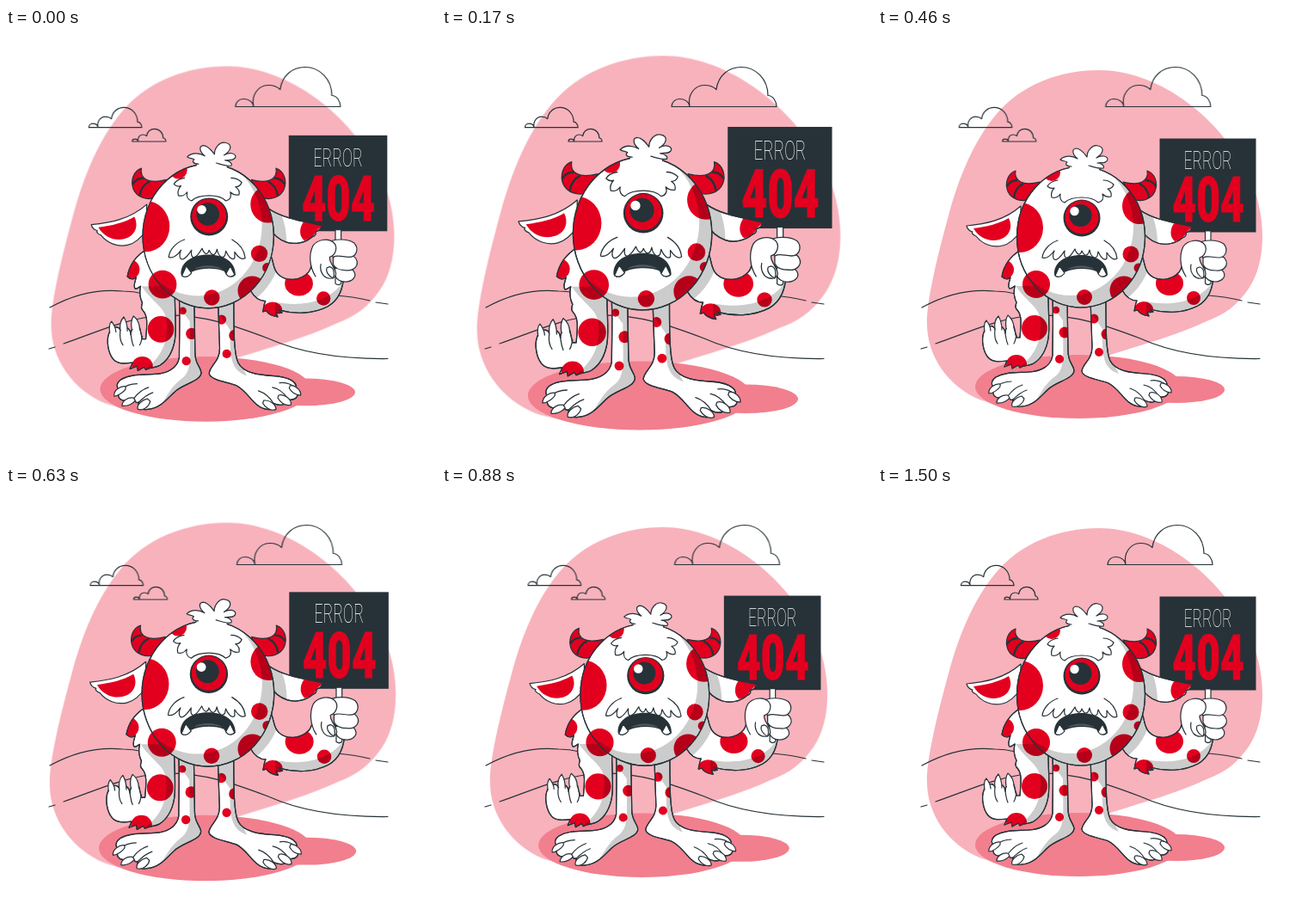
These frames come from a looping animation (500 by 500 pixels, 1.54 s). An HTML page without scripts:

```html
<!DOCTYPE html>
<html lang="en">
<head>
<meta charset="utf-8">
<title>Error 404</title>
<style>
  html, body { margin: 0; height: 100%; overflow: hidden; background: #fff; }
  svg { display: block; width: 100vw; height: 100vh; }

  .ink, .skin { stroke: #263238; stroke-width: 1.2; stroke-linecap: round; stroke-linejoin: round; }
  .ink { fill: none; }
  .skin { fill: #fff; }
  .red { fill: #e3001f; }
  .dark { fill: #263238; }
  .shade { fill: #000; opacity: .2; }
  .cloud { vector-effect: non-scaling-stroke; }
  .stripe { fill: none; stroke: #263238; stroke-width: 2.4; }

  .beat { animation: beat 1540ms linear -34ms infinite; }
  .blob { fill: #f8b2bc; transform-origin: 252px 249px; }
  .figure { transform-origin: 271px 291px; }
  .clouds { animation: shake 1540ms linear -34ms infinite; }

  .sign { font-family: Roboto, "Open Sans", sans-serif; text-anchor: middle; }
  .word { font-size: 29.5px; font-weight: 200; fill: #fff; }
  .code { font-size: 71.5px; font-weight: 900; stroke: #e3001f; stroke-width: .8; }

  @keyframes beat {
    0%, 30%, 40%, 60%, 100% { transform: scale(1); }
    10%, 50% { transform: scale(1.1); }
  }
  @keyframes shake {
    0%, 100% { transform: translateX(0); }
    10%, 90% { transform: translateX(-1px); }
    20%, 80% { transform: translateX(2px); }
    30%, 50%, 70% { transform: translateX(-4px); }
    40%, 60% { transform: translateX(4px); }
  }
</style>
</head>
<body>
<svg viewBox="0 0 500 500">
  <defs>
    <path id="cloud" class="ink cloud" d="M0 0C0-5 4-9 9-9C15-9 20-6 21 0C18-14 27-25 38-25C44-25 49-23 52-20C54-36 66-46 81-46C98-46 112-32 112-13C118-13 122-6 122 0Z"/>

    <ellipse id="body" cx="236" cy="243" rx="74.500" ry="82"/>
    <path id="earR" d="M305 212C321 223 343 226 365 231C364 236 361 237 358 238C359 241 357 243 354 244C346 251 334 253 325 250C316 247 309 240 305 233Z"/>
    <path id="armL" d="M166 258C153 266 146 277 144 289C147 292 151 293 154 290C153 295 150 300 153 303C156 303 157 301 159 300C157 309 159 315 161 319C160 323 159 325 162 328C168 335 166 346 165 360L161 360L158 347C152 345 148 348 148 355C147 346 140 345 136 350C134 345 126 345 123 354C120 362 122 376 128 383C133 389 142 388 150 387L147 394L155 391L156 396L163 392L165 395C170 392 176 393 181 390C192 383 196 373 198 361C200 348 198 332 198 310Z"/>
    <path id="armR" d="M305 262C311 268 308 280 316 287C325 295 341 294 350 284C354 279 355 271 356 264L390 285C390 300 386 315 372 323C355 332 334 332 316 327L320 330C317 331 315 331 313 330L315 335C309 334 304 332 302 328L298 329C299 325 299 321 301 317C295 317 289 314 284 305Z"/>
    <path id="legL" d="M203 315C204 340 203 361 203 381C201 393 190 399 176 400C160 401 147 400 137 406C130 411 132 417 136 418C131 425 135 431 144 430C146 432 149 430 151 428C153 432 154 433 157 432C155 439 161 441 167 440C182 439 190 427 198 420C207 411 228 408 228 398C227 391 221 389 221 376L220 315Z"/>
    <path id="legR" d="M247 315L249 371C249 386 238 390 237 399C238 407 258 409 268 413C282 420 287 438 303 440C309 441 312 438 310 433C318 437 325 435 327 429C337 430 340 424 336 416C337 407 324 403 311 402C294 401 276 399 270 387C265 377 265 350 265 315Z"/>

    <clipPath id="inBody"><use href="#body"/></clipPath>
    <clipPath id="inEarR"><use href="#earR"/></clipPath>
    <clipPath id="inArmL"><use href="#armL"/></clipPath>
    <clipPath id="inArmR"><use href="#armR"/></clipPath>
    <clipPath id="inLegL"><use href="#legL"/></clipPath>
    <clipPath id="inLegR"><use href="#legR"/></clipPath>

    <g id="horn">
      <path class="ink" style="fill:#e3001f" d="M160 166C151 169 147 180 151 190C155 199 166 203 178 199L188 179C180 181 172 182 166 179C160 176 159 171 160 166Z"/>
      <path class="stripe" d="M150 184C153 179 157 177 162 177M158 197C159 190 163 184 169 181"/>
    </g>
  </defs>

  <path class="blob beat" d="M257 49C322 49 392 98 428 166C441 190 447 218 447 242C447 268 441 288 431 303C418 322 404 333 382 341C350 356 315 366 270 380C240 390 218 442 170 440C150 440 134 438 118 432C82 417 57 382 57 344C56 318 70 262 82 218C94 174 111 132 137 101C166 66 211 49 257 49Z"/>

  <path class="ink" d="M51 325C78 310 107 303 136 306C144 306 152 307 160 309M384 311C398 312 411 314 423 317M430 319L444 321M50 373L57 371M67 367C105 354 140 337 182 334C231 333 268 347 305 361C347 380 394 385 444 384.500"/>

  <g class="clouds">
    <use href="#cloud" transform="translate(267 91.500)"/>
    <use href="#cloud" transform="translate(96.500 115.700) scale(.505)"/>
    <use href="#cloud" transform="translate(147 132) scale(.32)"/>
  </g>

  <g class="figure beat">
    <g fill="#f27f8e">
      <ellipse cx="233" cy="417" rx="120" ry="37"/>
      <ellipse cx="347" cy="420.500" rx="56" ry="15.500"/>
    </g>

    <g class="sign">
      <rect class="dark" x="327.500" y="128.500" width="112" height="109"/>
      <text class="word" transform="translate(383.500 163.500) scale(.595 1)">ERROR</text>
      <text class="code red" transform="translate(384 225.300) scale(.67 1)">404</text>
    </g>

    <!-- ears -->
    <path class="skin" d="M166 207C147 224 124 228 103 230C104 234 106 236 110 237C108 238 111 241 114 242C121 251 133 256 145 253C154 251 161 243 166 236Z"/>
    <path class="red" d="M111 233C126 231 140 228 152 221C157 231 153 240 146 244C135 250 119 247 111 233Z"/>
    <use href="#earR" class="skin"/>
    <g clip-path="url(#inEarR)" class="red">
      <path d="M345 226L366 231L358 238C357 243 351 247 345 248C338 242 340 232 345 226Z"/>
      <ellipse class="shade" cx="250" cy="250" rx="75" ry="82"/>
    </g>
    <use href="#earR" class="ink"/>

    <!-- left arm -->
    <use href="#armL" class="skin"/>
    <g clip-path="url(#inArmL)" class="red">
      <circle cx="147" cy="281" r="11"/>
      <circle cx="184" cy="298" r="16"/>
      <circle cx="182" cy="349" r="15"/>
      <ellipse cx="161" cy="391" rx="12" ry="11"/>
      <path class="shade" d="M160 300C178 325 191 324 189 350C188 371 178 384 163 396H205V300Z"/>
    </g>
    <use href="#armL" class="ink"/>
    <path class="ink" d="M148 355C149 361 149 364 151 368M136 350C135 358 136 363 139 367M161 357C160 361 160 364 158 367"/>
    <path class="skin" d="M124 353C123 347 124 342 126 340C129 344 131 348 131 352M136 350C135 344 137 338 140 335C143 340 144 346 144 351M149 349C148 343 149 337 151 334C156 338 158 343 158 349"/>

    <!-- right arm -->
    <use href="#armR" class="skin"/>
    <g clip-path="url(#inArmR)" class="red">
      <ellipse cx="339" cy="297" rx="16" ry="14"/>
      <circle cx="367" cy="314" r="8"/>
      <ellipse cx="309" cy="327" rx="11" ry="9"/>
      <ellipse class="shade" cx="246" cy="250" rx="74" ry="80"/>
      <path class="shade" d="M312 318C340 324 376 319 391 292V340H312Z"/>
    </g>
    <use href="#armR" class="ink"/>
    <path class="skin" d="M380.500 236H387V297Q384 300 380.500 297Z"/>
    <path class="skin" d="M380 280C386 277 399 278 402 284C405 290 399 295 392 295C386 295 381 292 380 287Z"/>
    <path class="skin" d="M378 267C385 262 401 263 404 269C408 276 402 283 393 282C386 282 380 280 378 275Z"/>
    <path class="skin" d="M370 252C378 245 395 246 402 251C408 258 404 267 396 267C389 267 383 264 378 267Z"/>
    <path class="skin" d="M358 289C351 278 350 264 355 254C360 247 372 245 378 250C384 255 381 265 374 267C373 274 382 280 381 287C379 293 371 292 367 288C364 284 363 279 364 275"/>
    <path class="skin" d="M374 278C379 279 380 286 378 291C373 289 369 283 371 279Z"/>

    <!-- legs -->
    <use href="#legL" class="skin"/>
    <g clip-path="url(#inLegL)" class="red">
      <circle cx="207" cy="328" r="4.200"/>
      <circle cx="217" cy="354" r="6.500"/>
      <circle cx="211" cy="385" r="5"/>
      <path class="shade" d="M200 310H232V410L165 447C190 435 186 420 206 405C218 396 215 380 215 340L203 324Z"/>
    </g>
    <use href="#legL" class="ink"/>
    <use href="#legR" class="skin"/>
    <g clip-path="url(#inLegR)" class="red">
      <circle cx="251" cy="338" r="5.500"/>
      <circle cx="266" cy="356" r="6.500"/>
      <circle cx="257" cy="377" r="5"/>
      <path class="shade" d="M245 310H268V380L280 402C263 396 260 384 261 350L245 327Z"/>
    </g>
    <use href="#legR" class="ink"/>
    <path class="ink" d="M136 418C142 413 148 411 155 411M151 428C156 421 162 417 168 415M157 432C163 426 167 423 173 421M336 416C330 411 323 409 317 410M327 429C322 420 314 416 309 415M310 433C305 425 299 421 293 419"/>
    <g class="skin">
      <path d="M142 414C137 413 128 418 129 425C134 425 140 420 142 417Z"/>
      <path d="M151 427C145 426 138 430 138 436C145 437 151 433 153 430Z"/>
      <path d="M167 428C161 429 154 435 156 440C163 442 169 436 170 431Z"/>
      <path d="M329 413C334 412 342 418 341 424C335 424 330 420 328 416Z"/>
      <path d="M316 424C322 422 331 428 330 435C323 437 317 431 315 427Z"/>
      <path d="M299 430C305 429 313 434 313 440C307 443 300 437 298 433Z"/>
    </g>

    <use href="#horn"/>
    <use href="#horn" transform="translate(473 0) scale(-1 1)"/>

    <!-- body -->
    <use href="#body" class="skin"/>
    <g clip-path="url(#inBody)" class="red">
      <ellipse cx="165" cy="232" rx="27" ry="29"/>
      <ellipse cx="304" cy="207" rx="20" ry="21"/>
      <circle cx="184" cy="298" r="16"/>
      <circle cx="240" cy="313" r="9"/>
      <circle cx="286" cy="305" r="16.500"/>
      <circle cx="294" cy="263" r="9.500"/>
      <circle cx="303" cy="279" r="5.500"/>
      <circle cx="202" cy="168" r="10"/>
      <path class="shade" fill-rule="evenodd" d="M150 150H320V335H150ZM151 231A73 80 0 0 0 297 231A73 80 0 0 0 151 231Z"/>
    </g>
    <use href="#body" class="ink"/>

    <!-- hair and brow -->
    <path fill="#fff" d="M223 158H257V167H223Z"/>
    <path class="skin" d="M225 161C219 161 217 158 220 156C217 154 214 155 212 153C218 147 227 149 232 152C226 147 225 141 230 140C236 140 240 146 243 150C243 143 249 135 256 137C264 139 262 146 254 151C260 147 267 149 267 153C266 158 259 156 255 157C260 157 264 161 262 163C256 164 249 161 245 160"/>
    <path class="skin" d="M209 177C203 178 199 180 197 184C199 186 202 187 205 186C202 189 201 193 202 197C206 198 210 196 212 193C211 198 213 202 217 203C221 199 228 197 237 197C246 197 252 199 256 203C261 202 263 198 261 193C264 196 267 197 271 196C272 192 270 189 267 187C270 187 273 185 274 182C271 179 267 177 262 177" />

    <!-- eye -->
    <circle class="dark" cx="237" cy="221" r="21.500"/>
    <circle class="red" cx="237" cy="220" r="19.500"/>
    <circle class="dark" cx="235.500" cy="218" r="13"/>
    <circle cx="228.500" cy="213" r="5.200" fill="#fff"/>

    <!-- mouth -->
    <path class="dark" d="M205 287C204 273 217 264 236 264C255 264 267 273 267 287C263 292 257 289 254 283C245 279 227 279 217 284C213 290 208 292 205 287Z"/>
    <path fill="#4d5961" d="M220 281C226 275 246 275 252 281C242 278 230 278 220 281Z"/>
    <path class="skin" d="M206 288L211 277L217 285C213 290 209 290 206 288ZM256 286L261 277L266 287C262 290 259 290 256 286Z"/>

    <path class="skin" d="M209 247C200 250 192 258 191 267C196 269 202 263 205 259C202 266 204 271 208 269C212 267 215 262 217 259C216 266 218 269 222 266C225 264 227 260 229 257C231 263 235 266 237 259C240 266 244 266 246 258C247 265 252 270 255 265L256 260C259 267 263 271 266 268L266 261C269 266 274 271 278 268C277 258 270 251 263 247"/>
  </g>
</svg>
</body>
</html>
```
